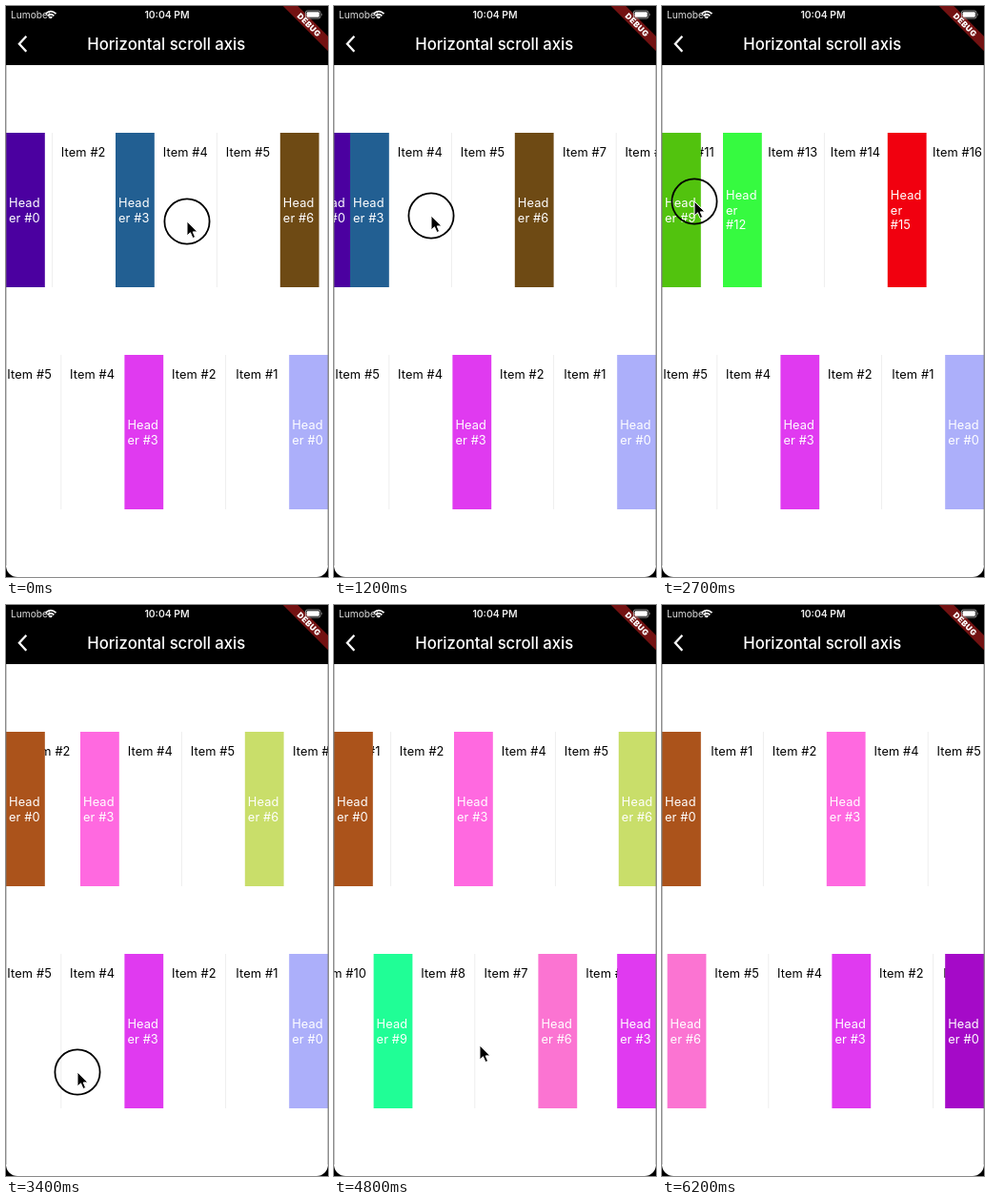
Recreate the animation shown at these times as an HTML page. Size 338x599 px, loop 6300 ms.

```html
<!DOCTYPE html>
<html lang="en">
<head>
<meta charset="utf-8">
<title>Horizontal scroll axis</title>
<style>
  html, body { margin: 0; width: 100%; height: 100%; overflow: hidden; background: #000; }
  svg { display: block; width: 338px; height: 599px; font-family: Inter, "Open Sans", sans-serif; }
  .cell { font-size: 12.8px; letter-spacing: .12px; }
  .mid { text-anchor: middle; }
</style>
</head>
<body>
<svg id="stage" viewBox="0 0 338 599" xmlns="http://www.w3.org/2000/svg">
  <rect width="338" height="599" fill="#000"/>
  <path d="M0 62H338V587A12 12 0 0 1 326 599H12A12 12 0 0 1 0 587Z" fill="#fff"/>
  <g id="lists" class="cell"></g>
  <path d="M.25 62V587M337.75 62V587" stroke="#777" stroke-width=".5"/>

  <g fill="#fff">
    <text x="5" y="13" font-size="10.2" fill="#ddd">Lumobel</text>
    <text class="mid" x="169" y="13" font-size="10.4" font-weight="600" fill="#eee">10:04 PM</text>
    <text class="mid" x="168.3" y="46" font-size="16.7" font-weight="500">Horizontal scroll axis</text>
  </g>
  <g fill="none" stroke="#fff">
    <path d="M41.5 8.2Q47 3 52.5 8.2M43.6 10.3Q47 7.2 50.4 10.3" stroke-width="1.7"/>
    <path d="M21.3 31.8L13.9 39.8L21.3 47.8" stroke-width="2.3"/>
  </g>
  <path d="M45 11.6Q47 10 49 11.6L47 13.6Z" fill="#fff"/>

  <g transform="translate(338 0) rotate(45)">
    <rect x="-40" y="22.4" width="80" height="11" fill="#731212"/>
    <text class="mid" x="0" y="31" font-size="8.4" font-weight="900" letter-spacing=".4" fill="#fff">DEBUG</text>
  </g>
  <rect x="314.4" y="5" width="15.6" height="8" rx="2" fill="none" stroke="#bbb" stroke-width=".8"/>
  <rect x="315.6" y="6.2" width="13.2" height="5.6" rx="1" fill="#fff"/>
  <path d="M331 7.5Q332.4 9 331 10.5Z" fill="#bbb"/>

  <g id="pointer">
    <circle id="touch" r="23.6" fill="none" stroke="#000" stroke-width="1.8"/>
    <path d="M0 0V15L3.5 11.8L6 17.5L8.6 16.4L6.2 10.9H11Z" fill="#000" stroke="#fff" stroke-width="1" stroke-linejoin="round"/>
  </g>
</svg>
<script>
const LOOP = 6300, STEP = 100;
const HEAD = 40.8, SECTION = 172.8, HEIGHT = 162;
const NS = 'http://www.w3.org/2000/svg';
const byId = id => document.getElementById(id);

function add(parent, tag, attrs, text) {
  const el = document.createElementNS(NS, tag);
  for (const key in attrs) el.setAttribute(key, attrs[key]);
  if (text) el.textContent = text;
  return parent.appendChild(el);
}

const moveTo = (el, x, y) => el.setAttribute('transform', `translate(${x.toFixed(2)} ${y.toFixed(2)})`);

// Monotone cubic through [time, value] points
function track(points) {
  const rate = i => (points[i + 1][1] - points[i][1]) / (points[i + 1][0] - points[i][0]);
  const last = points.length - 1;
  const slopes = points.map((p, i) => {
    if (i === 0) return rate(0);
    if (i === last) return rate(last - 1);
    const a = rate(i - 1), b = rate(i);
    return a * b > 0 ? 2 * a * b / (a + b) : 0;
  });
  return t => {
    if (t >= points[last][0]) return points[last][1];
    let i = 0;
    while (t >= points[i + 1][0]) i++;
    const [t0, v0] = points[i], [t1, v1] = points[i + 1];
    const h = t1 - t0, u = (t - t0) / h, w = 1 - u;
    return v0 * w * w * (1 + 2 * u) + v1 * u * u * (3 - 2 * u)
      + h * u * w * (slopes[i] * w - slopes[i + 1] * u);
  };
}

// dir 1 runs left to right from x = 0, dir -1 right to left
function makeList(y, dir, colors) {
  const root = add(byId('lists'), 'g');
  const bodies = add(root, 'g'), heads = add(root, 'g');
  const start = dir > 0 ? 0 : 338 - HEAD;
  const centers = dir > 0 ? [73.3, 139] : [-33.8, -99.8];
  const lineX = dir > 0 ? 106.4 : -66.6;

  const sections = colors.map((color, k) => {
    const body = add(bodies, 'g'), head = add(heads, 'g');
    add(body, 'rect', { x: lineX - .5, y: 0, width: 1, height: HEIGHT, fill: '#eee' });
    centers.forEach((x, i) =>
      add(body, 'text', { x, y: 25, class: 'mid' }, `Item #${3 * k + i + 1}`));
    const box = add(head, 'rect', { width: HEAD, height: HEIGHT, fill: color });
    const n = 3 * k;
    const lines = n < 10 ? ['Head', `er #${n}`] : ['Head', 'er', `#${n}`];
    lines.forEach((line, i) => add(head, 'text',
      { x: 3, y: 85.8 + 15.5 * (i - (lines.length - 1) / 2), fill: '#fff' }, line));
    return { body, head, box };
  });

  return (scroll, palette) => sections.forEach((s, k) => {
    const at = k * SECTION - scroll;
    const pinned = Math.max(at, Math.min(0, at + SECTION - HEAD));
    moveTo(s.body, start + dir * at, y);
    moveTo(s.head, start + dir * pinned, y);
    s.box.setAttribute('fill', palette[k]);
  });
}

const topFirst = ['#4b00a0', '#225f92', '#6e4a14', '#52c30e', '#36fa40', '#f1000f'];
const topLater = ['#ab531b', '#ff69e0', '#c9de6a', ...topFirst.slice(3)];
const lowFirst = ['#acaffa', '#e03af0', '#fb74d2', '#20fe96'];
const lowLater = ['#a50ac8', ...lowFirst.slice(1)];

const drawTop = makeList(133, 1, topFirst);
const drawLow = makeList(366, -1, lowFirst);

const topScroll = track([[0, 57.8], [1200, 155.8], [1500, 220], [1900, 313.4],
  [2700, 627.2], [3000, 380], [3400, 94.8], [4800, 46.8], [6200, 0]]);
const lowScroll = track([[3400, 0], [3900, 175], [4300, 245], [4800, 262.8],
  [5000, 263], [5500, 130], [5900, 66], [6200, 54]]);

const path = [[0, 190, 226], [1200, 102, 220], [1400, 55, 220], [1800, 250, 222],
  [1900, 253, 221], [2700, 34, 205], [3000, 270, 212], [3300, 78, 482],
  [3400, 75, 490], [3900, 250, 498], [4100, 262, 562], [4300, 235, 540],
  [4800, 153, 462], [5000, 190, 468], [5500, 60, 480], [5700, 75, 510], [6100, 130, 625]];
const pointerX = track(path.map(p => [p[0], p[1]]));
const pointerY = track(path.map(p => [p[0], p[2]]));
const presses = [[0, 1400], [1900, 3000], [3400, 3900], [5000, 5500]];

function draw(t) {
  drawTop(topScroll(t), t < 2700 ? topFirst : topLater);
  drawLow(t < 3400 ? 0 : lowScroll(t), t < 4800 ? lowFirst : lowLater);
  moveTo(byId('pointer'), pointerX(t), pointerY(t));
  const down = presses.some(([a, b]) => t >= a && t <= b);
  byId('touch').setAttribute('visibility', down ? 'visible' : 'hidden');
}

function tick() {
  draw(Math.floor(performance.now() % LOOP / STEP) * STEP);
  requestAnimationFrame(tick);
}
tick();
</script>
</body>
</html>
```
